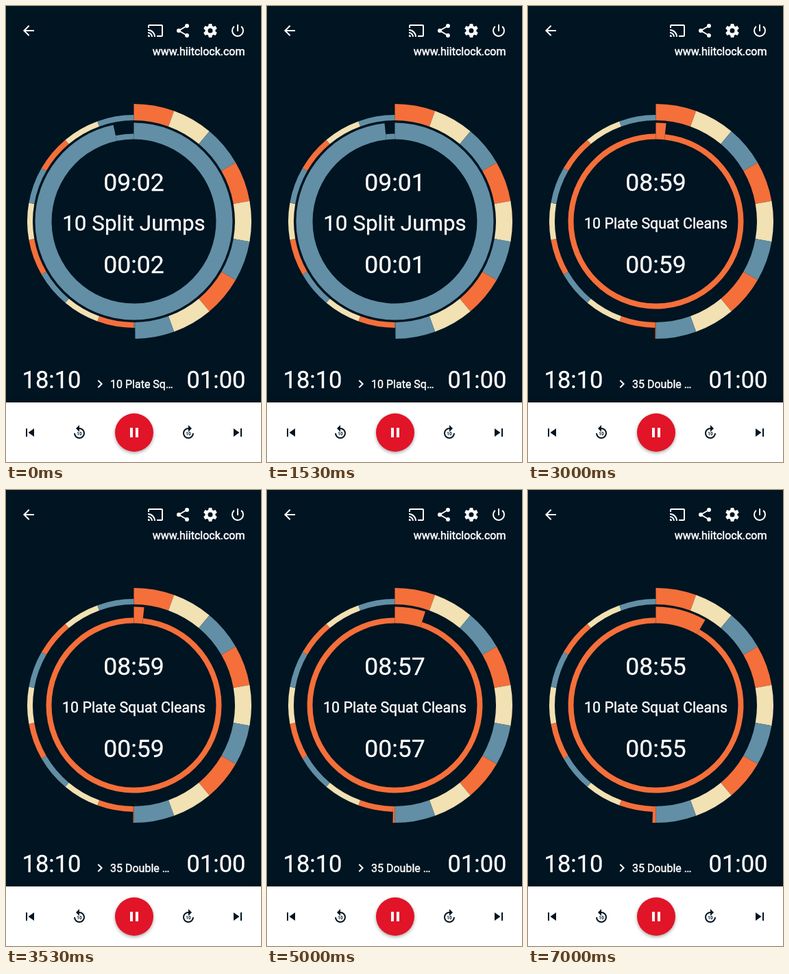
Recreate the animation shown at these times as an HTML page with a canvas. Size 372 by 666 pixels, loop 8 s.

```html
<!DOCTYPE html>
<html lang="en">
<head>
<meta charset="utf-8">
<title>Interval timer</title>
<style>
html, body { margin: 0; width: 100%; height: 100%; overflow: hidden; background: #001421; }
canvas { display: block; }
</style>
</head>
<body>
<canvas id="stage" width="372" height="666"></canvas>
<script>
const ctx = document.getElementById('stage').getContext('2d');
const DARK = '#001421', FLASH = '#757575', WHITE = '#fff', RED = '#e11428';
const ORANGE = '#f56f3a', CREAM = '#f1e1b3', BLUE = '#628fa5';
const SEGMENT_COLORS = [ORANGE, CREAM, BLUE];
const LOOP = 8000, TOTAL = 1080, SECTION = 60;
const TICKS = [1000, 2070, 3000, 4000, 5000, 6000, 7000];
const CX = 186.5, CY = 314.5;

const clock = s => [Math.floor(s / 60), s % 60].map(n => String(n).padStart(2, '0')).join(':');

function text(str, x, y, size, align = 'left', extra = 0) {
  ctx.font = `${size}px Roboto, sans-serif`;
  ctx.textAlign = align;
  ctx.fillText(str, x, y);
  if (extra) {
    ctx.lineWidth = extra;
    ctx.strokeText(str, x, y);
  }
}

// Annular sector; angles in degrees clockwise from the top.
function sector(from, to, inner, outer, color) {
  if (to <= from) return;
  const a = (from - 90) * Math.PI / 180, b = (to - 90) * Math.PI / 180;
  ctx.beginPath();
  ctx.arc(CX, CY, outer, a, b);
  ctx.arc(CX, CY, inner, b, a, true);
  ctx.fillStyle = color;
  ctx.fill();
}

// Icons live on a 24 px grid centred on (x, y).
function icon(x, y, color, draw) {
  ctx.save();
  ctx.translate(x - 12, y - 12);
  ctx.fillStyle = ctx.strokeStyle = color;
  ctx.lineWidth = 2;
  draw();
  ctx.restore();
}
const line = d => ctx.stroke(new Path2D(d));
const fill = d => ctx.fill(new Path2D(d));
function dot(x, y, r) {
  ctx.beginPath();
  ctx.arc(x, y, r, 0, 2 * Math.PI);
  ctx.fill();
}

const icons = {
  back() { line('M20 12H5.4M12.7 4.7L5.4 12l7.3 7.3'); },
  cast() {
    line('M2 8V5a1 1 0 0 1 1-1H21a1 1 0 0 1 1 1V19a1 1 0 0 1-1 1H14M1 11a10 10 0 0 1 10 10M1 15a6 6 0 0 1 6 6');
    fill('M1 18a3 3 0 0 1 3 3H1z');
  },
  share() {
    line('M18 5L6 12l12 7');
    dot(18, 5, 3);
    dot(6, 12, 3);
    dot(18, 19, 2.95);
  },
  gear() {
    ctx.translate(12, 12);
    ctx.lineWidth = 4;
    ctx.beginPath();
    ctx.arc(0, 0, 5.5, 0, 2 * Math.PI);
    ctx.stroke();
    for (let i = 0; i < 6; i++) {
      fill('M-3-6L-2.2-10H2.2L3-6z');
      ctx.rotate(Math.PI / 3);
    }
  },
  power() {
    line('M12 3V13');
    ctx.beginPath();
    ctx.arc(12, 12, 8, -0.87, Math.PI + 0.87);
    ctx.stroke();
  },
  chevron() { line('M9.3 6.7L14.6 12l-5.3 5.3'); },
  previous() { fill('M6 6h2v12H6zM9.5 12l8.5 6V6z'); },
  next() { fill('M6 18l8.5-6L6 6zM16 6h2v12h-2z'); },
  replay() {
    line('M12 6a7 7 0 1 1-7 7');
    fill('M12 1v10L7 6z');
    ten();
  },
  forward() {
    line('M12 6a7 7 0 1 0 7 7');
    fill('M12 1v10l5-5z');
    ten();
  },
  pause() { fill('M6 5h4v14H6zM14 5h4v14h-4z'); }
};

function ten() {
  ctx.font = 'bold 6.5px Roboto, sans-serif';
  ctx.textAlign = 'center';
  ctx.fillText('10', 12, 15.6);
}

function shadow(alpha, blur, dy) {
  ctx.shadowColor = `rgba(0,0,0,${alpha})`;
  ctx.shadowBlur = blur;
  ctx.shadowOffsetY = dy;
}

function drawHeader() {
  icon(33, 36, WHITE, icons.back);
  ['cast', 'share', 'gear', 'power'].forEach((name, i) => icon(218 + 40 * i, 36, WHITE, icons[name]));
  text('www.hiitclock.com', 348.5, 72, 16, 'right', 0.5);
}

function drawRings(elapsed, sectionElapsed, color) {
  const done = elapsed / TOTAL * 360;
  for (let i = 0; i < 18; i++) {
    const from = i * 20, to = from + 20, c = SEGMENT_COLORS[i % 3];
    sector(from, Math.min(to, done), 147.5, 171.5, c);
    sector(Math.max(from, done), to, 147.5, 155.5, c);
  }
  const sweep = sectionElapsed / SECTION * 360;
  sector(0, sweep, 120, 144, color);
  sector(sweep, 360, 120, 128, color);
}

function drawControls() {
  ctx.save();
  shadow(0.3, 8, 0);
  ctx.fillStyle = WHITE;
  ctx.fillRect(0, 579, 372, 87);
  shadow(0.35, 5, 2);
  ctx.fillStyle = RED;
  dot(187, 623, 28);
  ctx.restore();
  icon(187, 623, WHITE, icons.pause);
  icon(35, 623, DARK, icons.previous);
  icon(107, 623, DARK, icons.replay);
  icon(266, 623, DARK, icons.forward);
  icon(338, 623, DARK, icons.next);
}

function render(t) {
  const tick = TICKS.filter(at => t >= at).length;
  const second = tick >= 2;
  const left = 542 - tick;
  const sectionLeft = second ? SECTION + 2 - tick : 2 - tick;
  const flashing = (t >= 1000 && t < 1400) || (t >= 2070 && t < 3000);

  ctx.fillStyle = flashing ? FLASH : DARK;
  ctx.fillRect(0, 0, 372, 666);
  drawRings(TOTAL - left, SECTION - sectionLeft, second ? ORANGE : BLUE);

  ctx.fillStyle = ctx.strokeStyle = WHITE;
  drawHeader();
  text(clock(left), CX, 269.5, 35.5, 'center', 0.3);
  text(clock(sectionLeft), CX, 389.5, 35.5, 'center', 0.3);
  if (!second) text('10 Split Jumps', CX, 328, 31.4, 'center', 0.3);
  else if (t >= 2130) text('10 Plate Squat Cleans', CX, 325, 21.4, 'center', 0.4);

  text('18:10', 23.5, 557.5, 34.5, 'left', 0.3);
  text('01:00', 349.5, 557.5, 34.5, 'right', 0.3);
  icon(137, 552, WHITE, icons.chevron);
  text(second ? '35 Double …' : '10 Plate Sq…', 152, 558, 16, 'left', 0.4);
  drawControls();
}

function loop() {
  render(performance.now() % LOOP);
  requestAnimationFrame(loop);
}
loop();
</script>
</body>
</html>
```
